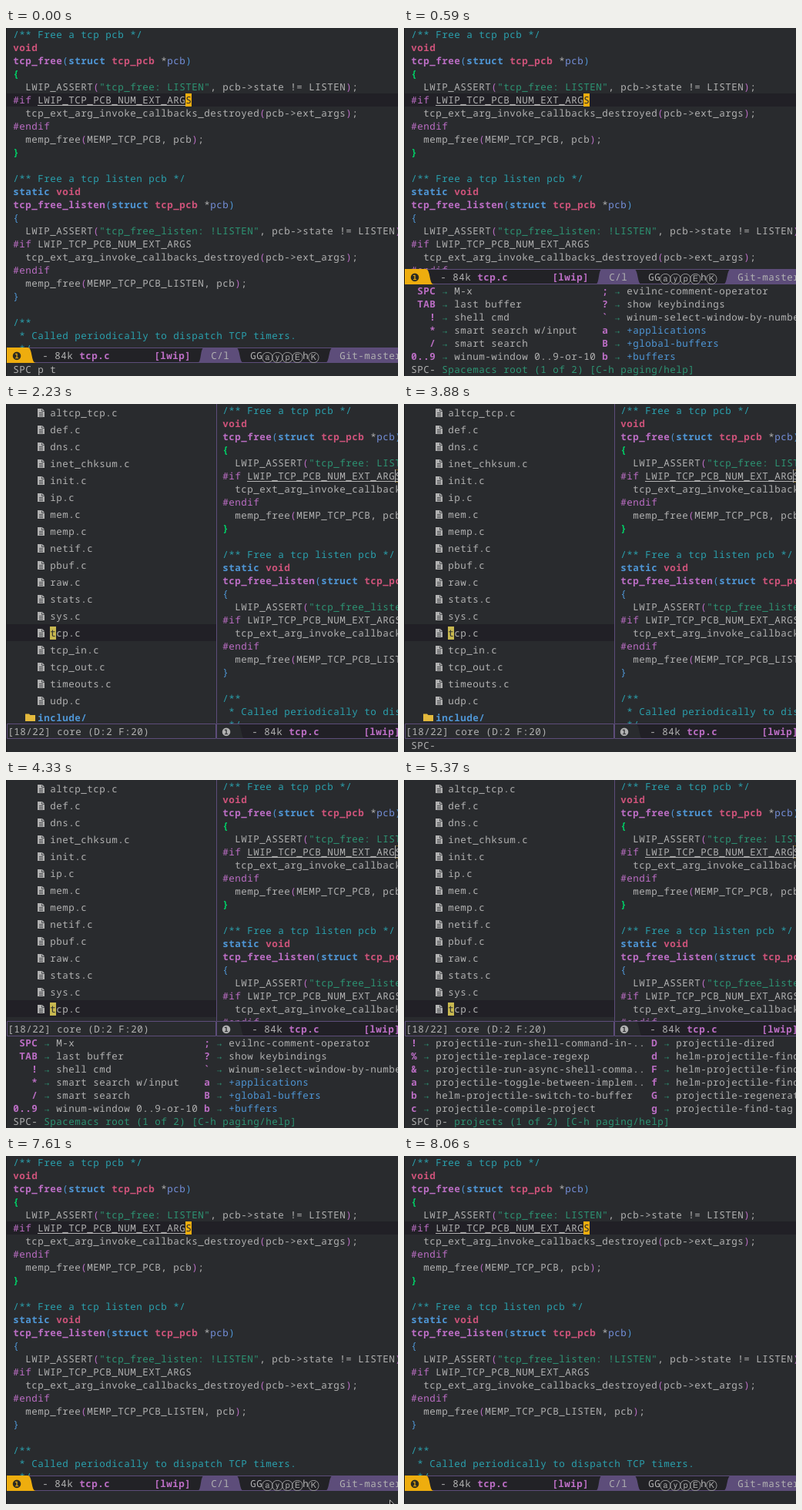
Write an HTML page that moves like this. It is 509x452 px and loops after 8.21 s.

```html
<!DOCTYPE html>
<html lang="en">
<head>
<meta charset="utf-8">
<title>Project tree toggle</title>
<style>
html, body { margin: 0; width: 100%; height: 100%; overflow: hidden; background: #292b2e; }
svg { display: block; }
text {
  font: 12.5px "Noto Sans Mono", "DejaVu Sans Mono", monospace;
  letter-spacing: .5px; white-space: pre; fill: #b2b2b2;
  text-rendering: geometricPrecision;
}
.c { fill: #2aa1ae; }
.k, .b { fill: #4f97d7; }
.t { fill: #ce537a; }
.f, .p { fill: #bc6ec5; }
.s { fill: #2d9574; }
.v { fill: #7590db; }
.m { fill: #00cd66; }
.k, .t, .f, .m { font-weight: 700; }
.d { fill: #292b2e; }
.round { font: 14px "DejaVu Sans", sans-serif; letter-spacing: 0; text-anchor: middle; }
.hl { fill: #212026; }
.violet { fill: #5d4d7a; }
.gold { fill: #eead0e; }

.wide, .split, #dock, #root, #proj, #echo text, #mouse { animation: 8210ms step-end infinite; }
.wide { animation-name: wide; }
.split { animation-name: split; }
#dock { animation-name: dock; }
#root { animation-name: root; }
#proj, #echo .proj { animation-name: proj; }
#echo .typed { animation-name: typed; }
#echo .spc { animation-name: spc; }
#echo .root { animation-name: hint; }
#echo .spcp { animation-name: spcp; }
#mouse { animation-name: mouse; }

@keyframes wide { 0% { opacity: 1 } 27.162% { opacity: 0 } 74.543%, 100% { opacity: 1 } }
@keyframes split { 0% { opacity: 0 } 27.162% { opacity: 1 } 74.543%, 100% { opacity: 0 } }
@keyframes dock {
  0%, 27.162%, 74.543%, 100% { transform: translateY(0) }
  7.186%, 52.741% { transform: translateY(-102px) }
}
@keyframes root { 0%, 18.027%, 65.408%, 100% { opacity: 0 } 7.186%, 52.741% { opacity: 1 } }
@keyframes proj { 0%, 27.162%, 74.543%, 100% { opacity: 0 } 18.027%, 65.408% { opacity: 1 } }
@keyframes typed { 0% { opacity: 1 } 1.827%, 100% { opacity: 0 } }
@keyframes spc { 0%, 14.495%, 59.927%, 100% { opacity: 0 } 1.827%, 47.259% { opacity: 1 } }
@keyframes hint { 0%, 14.495%, 59.927%, 100% { opacity: 0 } 5.359%, 52.741% { opacity: 1 } }
@keyframes spcp { 0%, 27.162%, 74.543%, 100% { opacity: 0 } 14.495%, 59.927% { opacity: 1 } }
@keyframes mouse {
  0%, 98.173%, 100% { opacity: 0; transform: translate(475px, 441px) }
  92.692% { opacity: 1; transform: translate(498px, 446px) }
  94.519% { opacity: 1; transform: translate(479px, 432px) }
  96.346% { opacity: 1; transform: translate(475px, 441px) }
}
</style>
</head>
<body>
<svg width="509" height="452" viewBox="0 0 509 452">
  <defs>
    <g id="code"></g>
    <g id="file">
      <path d="M0 0H6L9 3V11H0Z" fill="#b2b2b2"/>
      <path d="M5.5 .5V3.5H9M2 5.5H7M2 7.5H7M2 9.5H7" fill="none" stroke="#45474a" stroke-width=".9"/>
    </g>
  </defs>
  <rect width="509" height="452" fill="#292b2e"/>

  <g class="wide">
    <rect class="hl" x="1" y="85" width="508" height="17"/>
    <use href="#code"/>
    <rect class="gold" x="233" y="85" width="8" height="17"/>
    <text class="d" x="233.25" y="98">S</text>
  </g>

  <g class="split">
    <rect class="hl" x="1" y="286" width="272" height="22"/>
    <use href="#code" x="272"/>
    <path d="M505.5 85.5H513V101.5H505.5Z" fill="none" stroke="#eead0e" stroke-opacity="0.35"/>
    <path d="M505.5 85V102" stroke="#b2b2b2"/>
    <rect class="violet" x="273" width="1" height="416"/>
    <rect x="57" y="289" width="8" height="17" fill="#c8b850"/>
    <g id="tree"></g>
    <path d="M25 402.500H30L31.500 404H38V412H25Z" fill="#e3b93c"/>
  </g>

  <g id="dock">
    <rect y="415" width="509" height="140" fill="#292b2e"/>
    <g class="wide" id="bar">
      <rect x="1" y="415" width="508" height="20" fill="#222226"/>
      <path class="violet" d="M1 415H509V416H1ZM1 434H509V435H1Z"/>
      <path class="gold" d="M1 415H28C35 415 32 435 39 435H1Z"/>
      <path class="violet" d="M248 435C255 435 251 415 258 415H298C305 415 302 435 309 435Z"/>
      <path class="violet" d="M414 435C421 435 418 415 425 415H509V435Z"/>
      <text class="round" x="14" y="430.500" style="fill:#2b2a22">❶</text>
    </g>
    <g class="split" id="bars">
      <rect class="hl" x="274" y="415" width="235" height="20"/>
      <path class="d" d="M274 415H300C307 415 304 435 311 435H274Z"/>
      <path d="M1.500 415.500H272.500V434.500H1.500ZM510 415.500H273.500V434.500H510" fill="none" stroke="#5d4d7a"/>
      <text class="round" x="286" y="430.500">❶</text>
    </g>
  </g>

  <g id="root"></g>
  <g id="proj"></g>
  <g id="echo">
    <text class="typed" x="9.250" y="448">SPC p t</text>
    <text class="spc" x="9.250" y="448">SPC-</text>
    <text class="root s" x="49.250" y="448">Spacemacs root (1 of 2) [C-h paging/help]</text>
    <text class="spcp" x="9.250" y="448">SPC p-</text>
    <text class="proj s" x="65.250" y="448">projects (1 of 2) [C-h paging/help]</text>
  </g>
  <rect width="1" height="452" fill="#1b1b1d"/>
  <path id="mouse" d="M.5 .8V11L2.800 8.800L4.400 12.500L6 11.800L4.500 8.200H7.600Z" fill="#111" stroke="#eee" stroke-width=".8"/>
</svg>
<script>
const CELL = 8, ROW = 17;
const $ = id => document.getElementById(id);
const esc = s => s.replace(/&/g, '&amp;').replace(/</g, '&lt;');

// "~kword~" colours a word with class k
const paint = s => s.split('~').map((part, i) =>
  i % 2 ? `<tspan class="${part[0]}">${esc(part.slice(1))}</tspan>` : esc(part)).join('');
const line = (x, y, s) => `<text x="${x + .25}" y="${y}">${paint(s)}</text>`;
const add = (id, html) => $(id).insertAdjacentHTML('beforeend', html);

const body = (name, text, arg, brace) => [
  `~f${name}~~b(~~kstruct~ ~ttcp_pcb~ *~vpcb~~b)~`,
  `~${brace}{~`,
  `  LWIP_ASSERT~p(~~s"${text}"~, pcb->state != LISTEN~p)~;`,
  '~p#if~ LWIP_TCP_PCB_NUM_EXT_ARGS',
  '  tcp_ext_arg_invoke_callbacks_destroyed~p(~pcb->ext_args~p)~;',
  '~p#endif~',
  `  memp_free~p(~${arg}, pcb~p)~;`,
  `~${brace}}~`,
  ''
];
const code = [
  '~c/** Free a tcp pcb */~',
  '~tvoid~',
  ...body('tcp_free', 'tcp_free: LISTEN', 'MEMP_TCP_PCB', 'm'),
  '~c/** Free a tcp listen pcb */~',
  '~kstatic~ ~tvoid~',
  ...body('tcp_free_listen', 'tcp_free_listen: !LISTEN', 'MEMP_TCP_PCB_LISTEN', 'b'),
  '~c/**~',
  '~c * Called periodically to dispatch TCP timers.~',
  '~c */~'
];
add('code', code.map((s, i) => line(9, i * ROW + 13, s)).join('') +
  '<path d="M41 100.5H241" stroke="#b2b2b2"/>');

const files = ('altcp_tcp def dns inet_chksum init ip mem memp netif pbuf raw stats sys ' +
  'tcp tcp_in tcp_out timeouts udp').split(' ');
files.forEach((name, i) => {
  const y = i * 22 + 16;
  const label = name === 'tcp' ? '~dt~cp.c' : name + '.c';
  add('tree', `<use href="#file" x="41" y="${y - 10}"/>` + line(57, y, label));
});
add('tree', line(41, 412, '~kinclude/~'));

const label = (id, items) => add(id, items.map(([x, s]) => line(x, 430, s)).join(''));
label('bar', [[47, '- 84k ~ftcp.c~'], [192, '~f[lwip]~'], [266, 'C/l'],
  [317, 'GG'], [385, 'h'], [433, 'Git-master']]);
label('bars', [[2, '[18/22] core (D:2 F:20)'], [319, '- 84k ~ftcp.c~'], [464, '~f[lwip]~']]);
[...'ⓐⓨⓟⒺ Ⓚ'].forEach((ch, i) => {
  const x = i < 5 ? 339.5 + i * 13 : 399.5;
  if (ch !== ' ') add('bar', `<text class="round" x="${x}" y="430.5">${ch}</text>`);
});

// keys are right-aligned against the arrow column
const menu = (id, arrow, rows) => rows.forEach((row, i) => {
  const [key, name] = row.split(/ (.*)/);
  const text = name[0] === '+' ? `~b${name}~` : name;
  add(id, line(arrow - CELL * (key.length + 1), 346 + i * ROW, `~f${key}~ ~s→~ ${text}`));
});
menu('root', 49, ['SPC M-x', 'TAB last buffer', '! shell cmd',
  '* smart search w/input', '/ smart search', '0..9 winum-window 0..9-or-10']);
menu('root', 273, ['; evilnc-comment-operator', '? show keybindings',
  '` winum-select-window-by-number', 'a +applications', 'B +global-buffers', 'b +buffers']);
menu('proj', 25, ['! projectile-run-shell-command-in-..', '% projectile-replace-regexp',
  '& projectile-run-async-shell-comma..', 'a projectile-toggle-between-implem..',
  'b helm-projectile-switch-to-buffer', 'c projectile-compile-project']);
menu('proj', 337, ['D projectile-dired', 'd helm-projectile-find-dir',
  'F helm-projectile-find-file', 'f helm-projectile-find-file',
  'G projectile-regenerate-tags', 'g projectile-find-tag']);
</script>
</body>
</html>
```
